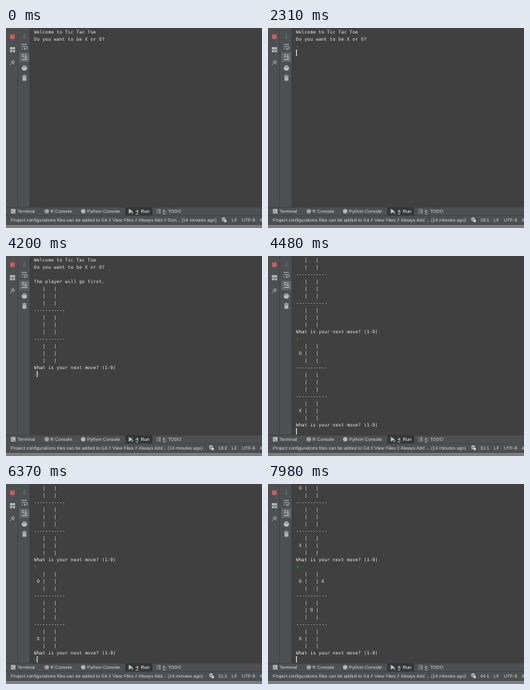
These frames come from a looping animation (320 by 251 pixels, 8 s). An HTML page with a canvas:

```html
<!DOCTYPE html>
<html lang="en">
<head>
<meta charset="utf-8">
<title>Tic Tac Toe console</title>
<style>
  html, body { margin: 0; width: 100%; height: 100%; overflow: hidden; background: #404040; }
  canvas { display: block; width: 320px; height: 251px; }
</style>
</head>
<body>
<canvas id="stage"></canvas>
<script>
const LOOP = 8000, W = 320, H = 251;
const LINE = 9, CHAR = 3.528, LEFT = 35, LAST_ROW = 24;
const MONO = '"DejaVu Sans Mono", monospace', SANS = '"Liberation Sans", sans-serif';

const canvas = document.getElementById('stage');
const ratio = window.devicePixelRatio || 1;
canvas.width = W * ratio;
canvas.height = H * ratio;
const ctx = canvas.getContext('2d');

// Each board is three strings of three cells, top row first.
const gap = '   |   |';
const board = rows => rows
  .map(cells => [gap, ' ' + [...cells].join(' | '), gap])
  .reduce((all, part) => [...all, '-----------', ...part]);
const ask = 'What is your next move? (1-9)';
const lines = [
  'Welcome to Tic Tac Toe', 'Do you want to be X or O?', 'x',
  'The player will go first.', ...board(['   ', '   ', '   ']), ask, '1',
  ...board(['O  ', '   ', 'X  ']), ask, '9',
  ...board(['O X', ' O ', 'X  ']), ask
];
const inputColors = { 2: '#486448', 16: '#2a8a30', 29: '#2a8a30' };

// Caret row and column; the status line number can run ahead of the console.
const states = [
  { at: 0, row: 2, col: 0, line: 0 },
  { at: 70, row: 2, col: 0, line: 4 },
  { at: 1470, row: 2, col: 1, line: 4 },
  { at: 2240, row: 3, col: 0, line: 5 },
  { at: 2310, row: 3, col: 0, line: 18 },
  { at: 2380, row: 16, col: 0, line: 18 },
  { at: 3780, row: 16, col: 1, line: 18 },
  { at: 4410, row: 29, col: 0, line: 31 },
  { at: 6230, row: 29, col: 1, line: 31 },
  { at: 7700, row: 42, col: 0, line: 44 }
];
const caretHidden = [[0, 70], [2030, 2240], [3010, 3570], [5040, 5670], [6790, 7350]];

function rect(x, y, w, h, color) {
  ctx.fillStyle = color;
  ctx.fillRect(x, y, w, h);
}

function dot(x, y, r, color) {
  ctx.fillStyle = color;
  ctx.beginPath();
  ctx.arc(x, y, r, 0, 7);
  ctx.fill();
}

function stroke(path, color = '#b4b6b8', width = 0.9) {
  ctx.strokeStyle = color;
  ctx.lineWidth = width;
  ctx.stroke(new Path2D(path));
}

// Laid out ten times larger so that small glyphs keep fractional advances.
function text(str, x, y, size, family, color, { style = '', align = 'left' } = {}) {
  ctx.save();
  ctx.translate(x, y);
  ctx.scale(0.1, 0.1);
  ctx.font = `${style} ${size * 10}px ${family}`;
  ctx.textRendering = 'geometricPrecision';
  ctx.textAlign = align;
  ctx.fillStyle = color;
  ctx.fillText(str, 0, 0);
  ctx.restore();
}

const label = (str, x, y, color = '#d2d4d5', options) => text(str, x, y, 5.83, SANS, color, options);

function drawConsole({ row, col }, t) {
  const scroll = Math.max(0, row - LAST_ROW);
  const count = row + (col ? 1 : 0);
  for (let i = scroll; i < count; i++) {
    const input = inputColors[i];
    text(lines[i], LEFT, (i - scroll) * LINE + 6.6, 5.86, MONO, input || '#e2e2e2',
      { style: input ? 'italic' : '' });
  }
  if (!caretHidden.some(([from, to]) => t >= from && t < to)) {
    rect(LEFT + col * CHAR, (row - scroll) * LINE, 1.1, 8, '#dedede');
  }
}

function drawSidebar() {
  rect(0, 0, 30, 225, '#4d5052');
  rect(14, 0, 1, 225, '#434648');
  rect(29.5, 0, 0.8, 225, '#393b3c');

  rect(5.2, 8.2, 5.6, 5.6, '#cb5f5d');
  rect(4.8, 24, 6.6, 2.8, '#b4b6b8');
  rect(4.8, 27.6, 3, 2.8, '#b4b6b8');
  rect(8.4, 27.6, 3, 2.8, '#b4b6b8');
  stroke('M5 46.5L7.5 44M6 41.5L10 45.5M8.5 40.5L11.2 43.2M7 43L9.4 41M8.6 44.6L10.5 42.4');

  stroke('M23 7V13M20.8 11L23 13.2L25.2 11', '#6d7072');
  stroke('M19.5 20.5H26M19.5 23.2H25Q26.6 23.2 26.6 24.7T25 26.2H23M24 24.8L22.5 26.2L24 27.5M19.5 26.2H21');
  rect(17, 31, 12, 11.5, '#64686a');
  stroke('M20 33.5H23M20 35.8H23M20 39.5H26.5M24.8 33V38M23.2 36.4L24.8 38L26.4 36.4', '#c6c8c9');
  rect(20.8, 47, 4.4, 1.5, '#b4b6b8');
  rect(19.6, 49, 6.8, 2.8, '#b4b6b8');
  rect(20.8, 51.4, 4.4, 1.8, '#d0d2d3');
  rect(20, 59.6, 6, 1, '#b4b6b8');
  rect(22, 58.8, 2, 1, '#b4b6b8');
  rect(20.6, 61.2, 4.8, 5, '#b4b6b8');
}

function drawTabs() {
  rect(0, 225, W, 11, '#4d5052');
  rect(0, 224.6, W, 0.7, '#393b3c');
  rect(149, 225, 34, 10.5, '#343638');
  rect(0, 235.3, W, 0.8, '#3e4042');

  rect(6.2, 227.2, 5.6, 5.6, '#b9bbbd');
  stroke('M7.4 228.6L8.8 230L7.4 231.4M9.2 231.6H10.8', '#4d5052', 0.7);
  label('Terminal', 14.3, 232.2);
  dot(51, 230, 2.8, '#9ea2a5');
  label('R Console', 55.4, 232.2);
  dot(96.5, 230, 2.8, '#b4b8ba');
  label('Python Console', 101.3, 232.2);
  ctx.fillStyle = '#c0c2c3';
  ctx.fill(new Path2D('M153.5 227L158.6 230L153.5 233Z'));
  dot(158, 232.3, 1.2, '#59a869');
  label('4: Run', 162, 232.2, '#ffffff');
  rect(162, 233, 3.3, 0.6, '#ffffff');
  stroke('M188 228H189M190 228H193.5M188 230H189M190 230H193.5M188 232H189M190 232H193.5');
  label('6: TODO', 196, 232.2);
  rect(196, 233, 3.3, 0.6, '#d2d4d5');
}

function drawStatus({ line, col }) {
  rect(0, 236, W, 11, '#4d5052');
  rect(0, 246, W, 1, '#424446');
  rect(0, 247, W, 4, '#7b7d7e');

  const cut = !line ? ' // Don...' : line < 10 ? ' /...' : col ? '...' : ' ...';
  label(`Project configurations files can be added to Git // View Files // Always Add${cut} (14 minutes ago)`,
    6, 242.6);
  const x = !line ? 272.5 : line < 10 ? 259.5 : 256.8;
  dot(x - 0.5, 239.9, 2.5, '#b4b6b8');
  rect(x - 3.2, 239.8, 5.4, 1, '#6d7072');
  dot(x + 1.6, 242.2, 1.6, '#d0d2d3');
  if (line) label(`${line}:${col + 1}`, 276.6, 242.6, undefined, { align: 'right' });
  label('LF', 282.3, 242.6);
  label('UTF-8', 295, 242.6);
  label('4 spaces', 317, 242.6);
}

function draw(now) {
  const t = now % LOOP;
  const state = states.findLast(s => s.at <= t);
  ctx.setTransform(ratio, 0, 0, ratio, 0, 0);
  rect(0, 0, W, H, '#404040');
  drawConsole(state, t);
  drawSidebar();
  drawTabs();
  drawStatus(state);
}

const start = performance.now();
function tick() {
  draw(performance.now() - start);
  requestAnimationFrame(tick);
}
tick();
</script>
</body>
</html>
```
